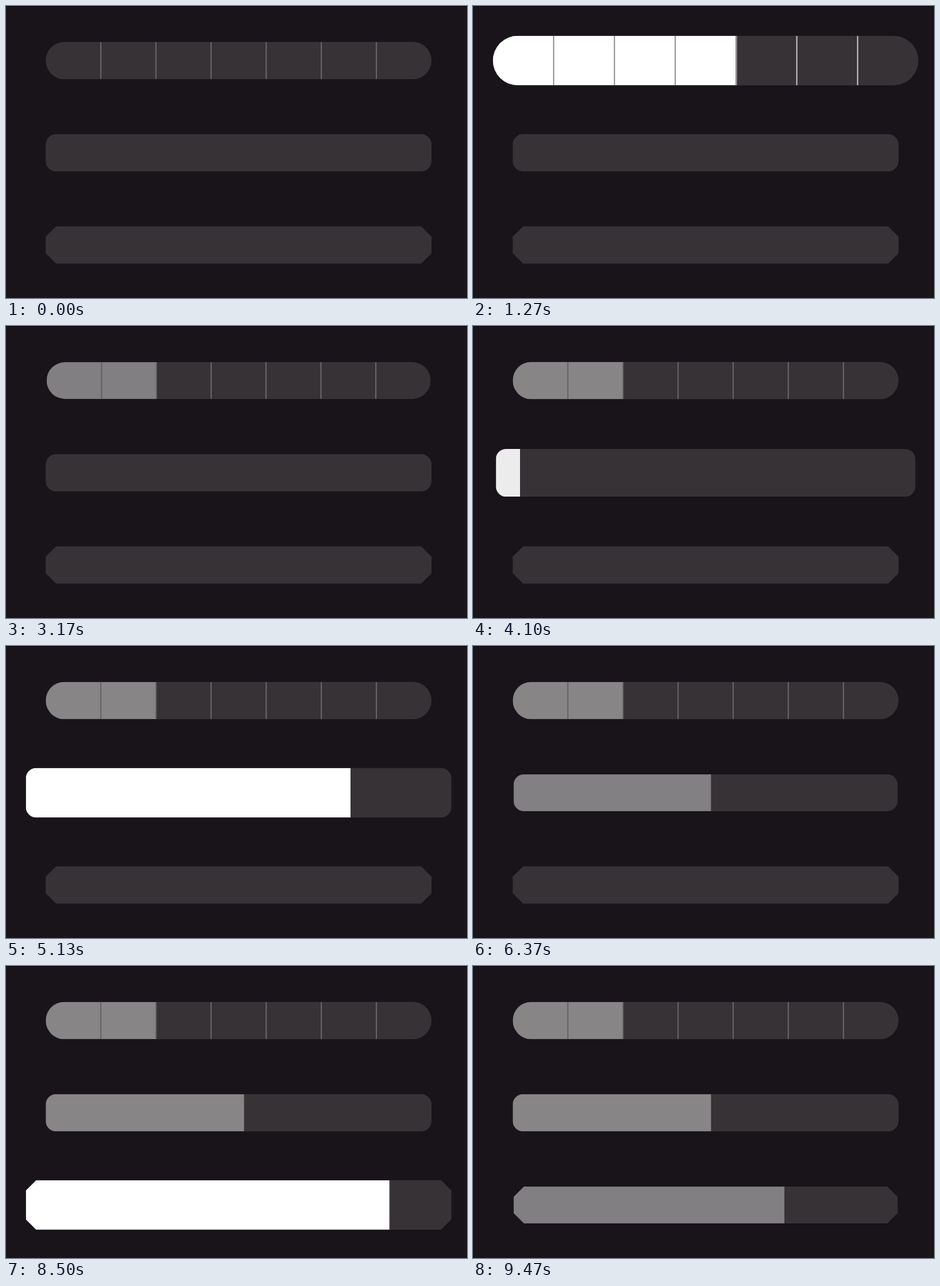
An HTML page with a canvas that plays this animation: 598 by 380 pixels, repeating every 9500 ms.

```html
<!DOCTYPE html>
<html lang="en">
<head>
<meta charset="utf-8">
<title>Sliders</title>
<style>
  html, body { margin: 0; width: 100%; height: 100%; overflow: hidden; background: #19141a; }
  canvas { display: block; width: 598px; height: 380px; }
</style>
</head>
<body>
<canvas id="stage" width="598" height="380"></canvas>
<script>
const ctx = document.getElementById('stage').getContext('2d');
const LOOP = 9500;
const CENTER_X = 301.75;
const TRACK = [55, 50, 54];

const clamp = (v) => Math.min(1, Math.max(0, v));
const mix = (a, b, k) => a + (b - a) * k;
const easeOut = (power) => (u) => 1 - (1 - u) ** power;
const smooth = (u) => u * u * (3 - 2 * u);
const snap = easeOut(5);

// Underdamped spring going from 0 to 1.
function spring(ms) {
  if (ms <= 0) return 0;
  const damping = 0.7, omega = 2 * Math.PI / 0.55, root = Math.sqrt(1 - damping ** 2);
  const x = omega * ms / 1000;
  return 1 - Math.exp(-damping * x) * (Math.cos(root * x) + damping / root * Math.sin(root * x));
}

const step = (start, segments) => [start, start + 340, segments / 7, snap];

// Each move is [start, end, fill level, easing].
const sliders = [
  {
    y: 71, shape: 'capsule', segments: 7, press: 90, release: 2785,
    moves: [step(130, 1), step(260, 2), step(390, 3), step(520, 4), step(660, 5),
            step(1075, 4), step(1705, 3), step(2060, 2)]
  },
  {
    y: 191, shape: 'round', press: 3890, release: 5960,
    moves: [[3960, 4830, 0.82, smooth], [4830, 5920, 0.514, smooth]]
  },
  {
    y: 311, shape: 'bevel', press: 6830, release: 9065,
    moves: [[6830, 7694, 1, easeOut(3)], [8030, 8980, 0.705, smooth]]
  }
];

function fillLevel(moves, t) {
  let level = 0, previous = 0;
  for (const [start, end, to, ease] of moves) {
    level += (to - previous) * ease(clamp((t - start) / (end - start)));
    previous = to;
  }
  return clamp(level);
}

function outline(shape, x, y, w, h) {
  const cut = 13.5, r = x + w, b = y + h;
  ctx.beginPath();
  if (shape !== 'bevel') {
    ctx.roundRect(x, y, w, h, shape === 'capsule' ? h / 2 : cut);
    return;
  }
  ctx.moveTo(x + cut, y);
  ctx.lineTo(r - cut, y);
  ctx.lineTo(r, y + cut);
  ctx.lineTo(r, b - cut);
  ctx.lineTo(r - cut, b);
  ctx.lineTo(x + cut, b);
  ctx.lineTo(x, b - cut);
  ctx.lineTo(x, y + cut);
  ctx.closePath();
}

function drawSlider(slider, t) {
  const active = spring(t - slider.press) - spring(t - slider.release);
  const w = mix(500.5, 552, active);
  const h = mix(48.5, 64.6, active);
  const x = CENTER_X - w / 2;
  const y = slider.y - h / 2;
  const edge = x + w * fillLevel(slider.moves, t);

  outline(slider.shape, x, y, w, h);
  ctx.fillStyle = `rgb(${TRACK})`;
  ctx.fill();

  ctx.save();
  ctx.clip();
  ctx.fillStyle = `rgba(255,255,255,${clamp(mix(0.405, 1, active))})`;
  ctx.fillRect(x, y, edge - x, h);
  if (slider.segments) {
    const glow = clamp(active);
    const onTrack = mix(106, 200, glow), onFill = mix(98, 140, glow);
    for (let i = 1; i < slider.segments; i++) {
      const lineX = x + w * i / slider.segments;
      const shade = lineX < edge - 1 ? onFill : onTrack;
      ctx.fillStyle = `rgb(${shade},${shade},${shade})`;
      ctx.fillRect(lineX - 0.75, y, 1.5, h);
    }
  }
  ctx.restore();
}

function frame(now) {
  const t = now % LOOP;
  ctx.fillStyle = '#19141a';
  ctx.fillRect(0, 0, 598, 380);
  ctx.fillStyle = '#0c090d';
  ctx.fillRect(0, 0, 598, 1);
  for (const slider of sliders) drawSlider(slider, t);
  requestAnimationFrame(frame);
}
requestAnimationFrame(frame);
</script>
</body>
</html>
```
